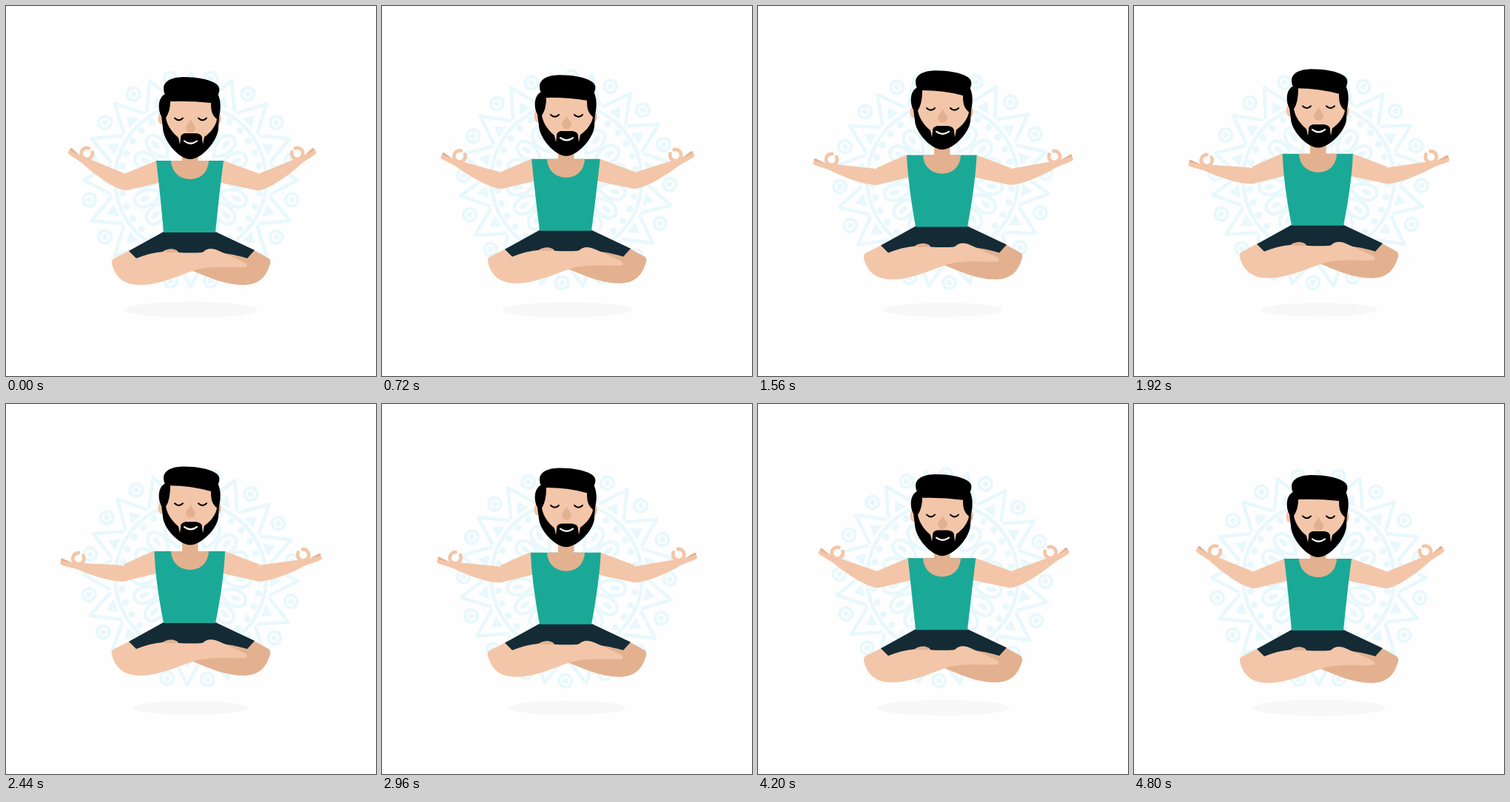
An HTML page with a canvas that plays this animation: 500x500 px, repeating every 5.04 s.

```html
<!DOCTYPE html>
<html lang="en">
<head>
<meta charset="utf-8">
<title>Floating meditation</title>
<style>
html, body { margin: 0; width: 100%; height: 100%; overflow: hidden; background: #fefefe; }
canvas { display: block; width: 500px; height: 500px; }
</style>
</head>
<body>
<canvas id="stage" width="500" height="500"></canvas>
<script>
const ctx = document.getElementById('stage').getContext('2d');
const LOOP = 5040, STEP = 40, FLOAT_TIME = 4620, SPIN_TIME = 4680;
const TAU = Math.PI * 2, RAD = Math.PI / 180;
const SKIN = '#f3c6a9', SHADE = '#e3b18f', SHIRT = '#1ba997', SHORTS = '#142b36';
const HAIR = '#000', LACE = '#e8f8fc', GROUND = '#f7f7f7', PAPER = '#fefefe';

function fill(path, color) {
  ctx.fillStyle = color;
  ctx.fill(new Path2D(path));
}

function line(path, color, width) {
  ctx.strokeStyle = color;
  ctx.lineWidth = width;
  ctx.lineCap = ctx.lineJoin = 'round';
  ctx.stroke(new Path2D(path));
}

function ellipse(x, y, rx, ry, color) {
  ctx.fillStyle = color;
  ctx.beginPath();
  ctx.ellipse(x, y, rx, ry, 0, 0, TAU);
  ctx.fill();
}

function ring(x, y, r, color, width, from = 0, to = TAU) {
  ctx.strokeStyle = color;
  ctx.lineWidth = width;
  ctx.lineCap = 'round';
  ctx.beginPath();
  ctx.arc(x, y, r, from, to);
  ctx.stroke();
}

function group(draw) {
  ctx.save();
  draw();
  ctx.restore();
}

function shifted(dy, draw) {
  group(() => { ctx.translate(0, dy); draw(); });
}

function mandala(angle) {
  group(() => {
    ctx.translate(249.5, 234.8);
    ctx.rotate(angle);
    ring(0, 0, 102, LACE, 4.8);
    for (let i = 0; i < 16; i++) {
      group(() => {
        ctx.rotate(i * TAU / 16);
        line('M109 -19L145 0L109 19', LACE, 4.5);
        fill('M108 -9L122 0L108 9Z', LACE);
        line('M44 0C54 -10 64 -12 72 -10C84 -7 84 7 72 10C64 12 54 10 44 0', LACE, 4.5);
        ellipse(67, 0, 7, 3.5, LACE);
        ellipse(94, 0, 4.6, 4.6, LACE);
        ctx.rotate(TAU / 32);
        ellipse(94, 0, 4.6, 4.6, LACE);
        ring(139.3, 0, 8.5, LACE, 4);
        ellipse(139.3, 0, 3.8, 3.8, LACE);
      });
    }
  });
}

function arm(shoulder, elbowShift, angle) {
  ctx.translate(elbowShift, 0);
  fill(`M${shoulder + 8} 209H${shoulder}L161 226.5L164 249L${shoulder + 8} 238Z`, SKIN);
  ctx.translate(163, 238);
  ctx.rotate(-angle * RAD);
  ctx.translate(-163, -238);
  line('M101 206L88 194', SHADE, 4);
  fill('M161 226.5L118 209L101 203L87 195C83 195 83 199 86 201' +
    'C96 208 101 210 108 217C122 229 145 246 160 249C171 251 171 233 161 226.5Z', SKIN);
  ellipse(109.3, 199.3, 5.8, 5.8, PAPER);
  ring(109.3, 199.3, 7.6, SKIN, 4.8, -12 * RAD, 290 * RAD);
}

function arms(left, right, tilt) {
  group(() => arm(left, -1.8 * tilt, 19 * tilt));
  group(() => {
    ctx.translate(503, 0);
    ctx.scale(-1, 1);
    arm(503 - right, 0, 14.5 * tilt);
  });
}

function legs() {
  fill('M290 328L335 330L355 341Q359 344 356 351C351 367 341 377 320 377' +
    'C296 377 272 366 245 355Z', SHADE);
  fill('M168 330L146 341Q142 343 143 348C147 365 158 377 181 377' +
    'C208 377 236 363 258 356L272 332L220 325Z', SKIN);
  fill('M213 333C218 326 228 326 232 333Z', SHADE);
  fill('M213 305H283L336 330L326 341C306 335 288 332 266 333Q249 334 233 333' +
    'C230 327 218 327 212 332C200 333 188 336 176 341L166 331Z', SHORTS);
  fill('M240 345L267 332C273 326 281 328 288 331L321 346Q327 348 325 352.5' +
    'C307 355 282 349 250 358Z', SKIN);
}

function torso(left, right, tilt) {
  const bow = 5 * tilt;
  fill(`M${left} 209H${right}Q${(right + 283) / 2 + bow} 250 283 306H213` +
    `Q${(left + 213) / 2 - bow} 250 ${left} 209Z`, SHIRT);
  fill('M238 190H259.5V209H274C273 225 263 234 249 234C235 234 224 225 223 209H238Z', SHADE);
}

function head(tilt) {
  // Parts at different depths move by different amounts as the head tilts back.
  const move = amount => y => y - amount * tilt;
  const h = move(1.5), b = move(2.5), jaw = move(5), chin = move(6.5);

  ellipse(210, h(152), 4.5, 8, SKIN);
  ellipse(286, h(152), 4.5, 8, SHADE);
  fill(`M215 ${h(119)}C205 ${h(124)} 205 ${h(140)} 210 ${h(149)}L212 ${b(165)}` +
    `C213 ${jaw(183)} 234 ${chin(207)} 249 ${chin(207)}C264 ${chin(207)} 286 ${jaw(183)} 287 ${b(165)}` +
    `L288 ${h(149)}C291 ${h(138)} 290 ${h(125)} 286 ${h(119)}Z`, HAIR);
  shifted(h(0), () => fill('M213 112C213 100 226 96 241 96C258 96 274 99 282 104' +
    'C288 107 290 112 287 119Q284 131 277 131L222 128Q213 121 213 112Z', HAIR));
  fill(`M222 ${move(9)(129)}Q250 ${move(8)(128)} 277 ${move(3)(131)}` +
    `C277 ${b(141)} 278 ${b(147)} 285 ${b(153)}C284 ${b(161)} 277 ${b(171)} 268 ${b(177)}` +
    `L266 ${b(187)}L265 ${b(179)}C265 ${b(174)} 260 ${b(172)} 255 ${b(172)}H244` +
    `C239 ${b(172)} 236 ${b(174)} 236 ${b(179)}L235 ${b(187)}L233 ${b(178)}` +
    `C226 ${b(172)} 218 ${b(163)} 216 ${b(151)}Q222 ${b(142)} 222 ${move(9)(129)}Z`, SKIN);
  shifted(-7.3 * tilt, () => {
    fill('M249.5 153C247 158 243 161 243 165Q244 171 249.5 171Q255 171 256 165C256 161 252 158 249.5 153Z', SHADE);
    line('M228 151.5Q233.5 157 239 151.5M260 151.5Q265.5 157 271 151.5', HAIR, 2);
  });
  shifted(b(0), () => fill('M236 180C236 174 239 172 244 172H255C261 172 265 174 265 180L262 184H239Z', HAIR));
  shifted(-6.5 * tilt, () => line('M241 182.5Q249.5 189 258 182.5', '#fff', 2.2));
}

function render(now) {
  const time = Math.floor(now % LOOP / STEP) * STEP;
  const lift = (1 - Math.cos(TAU * Math.min(time / FLOAT_TIME, 1))) / 2;
  const spin = Math.min(time / SPIN_TIME, 1) * TAU / 4;
  const tilt = Math.pow(lift, 0.75);
  const left = 203 - 2.5 * tilt, right = 294 + 2 * tilt;

  ctx.fillStyle = PAPER;
  ctx.fillRect(0, 0, 500, 500);
  ellipse(249.7, 410.5, 90.3 - 12.8 * lift, 10.7 - 1.6 * lift, GROUND);
  mandala(spin);
  shifted(-10 * lift, () => {
    arms(left, right, tilt);
    legs();
    torso(left, right, tilt);
    head(tilt);
  });
}

const start = performance.now();
function tick() {
  render(performance.now() - start);
  requestAnimationFrame(tick);
}
tick();
</script>
</body>
</html>
```
